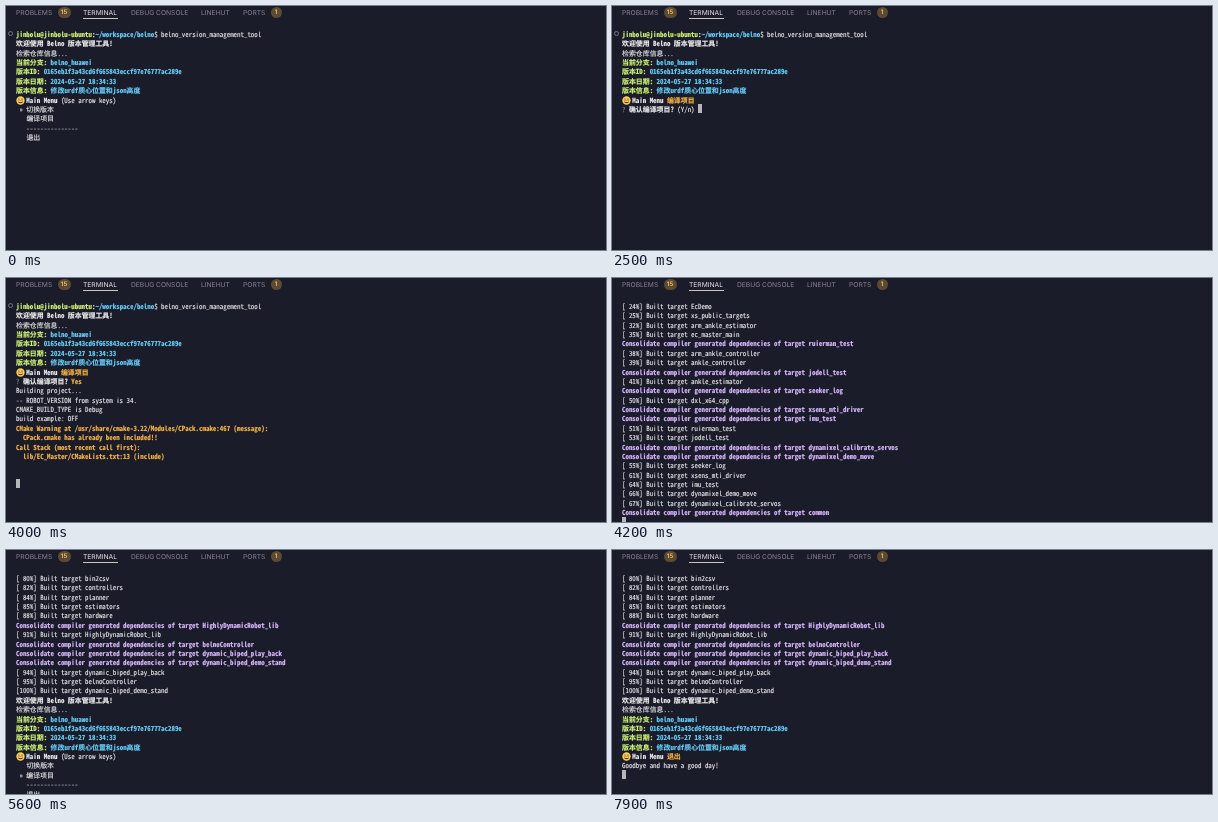
An HTML page that plays this animation: 600x244 px, repeating every 8 s.

```html
<!DOCTYPE html>
<html>
<head>
<meta charset="utf-8">
<title>Terminal session</title>
<style>
html, body { margin: 0; width: 100%; height: 100%; overflow: hidden; background: #1a1c29; }
#stage {
  position: relative; width: 600px; height: 244px; overflow: hidden;
  background: #1a1c29; text-rendering: geometricPrecision;
}
#stage > * { position: absolute; }
.tab {
  top: 1.5px; height: 10px; white-space: pre;
  font: 6.7px/10px Inter, Roboto, sans-serif; color: #85868f;
}
.tab.on { color: #e8e8ea; }
.line { left: 77px; top: 12px; width: 35px; height: 1px; background: #cfc4b6; }
.badge {
  top: 1px; height: 11px; border-radius: 5.5px; background: #5d4a33; color: #f6c270;
  font: 600 6.2px/11.4px Inter, Roboto, sans-serif; text-align: center;
}
.ring { left: 2px; top: 25px; width: 3.4px; height: 3.4px; border: .8px solid #74767f; border-radius: 50%; }
.row {
  left: 10px; height: 9.37px; line-height: 9.37px; white-space: pre; color: #e6e7e8;
  font-family: "Noto Sans Mono CJK SC", "Noto Sans Mono CJK JP", "Noto Sans Mono", monospace;
  -webkit-text-stroke: .15px;
}
.row i {
  font: inherit; font-size: 6.92px; line-height: 0;
  font-family: "Noto Sans Mono CJK SC", "Noto Sans CJK SC", "Noto Sans CJK", "Noto Sans CJK JP", sans-serif;
}
.row svg { position: absolute; left: 0; top: .3px; width: 9px; height: 9px; }
.b, .g, .c, .p, .o { font-weight: 700; }
.b { color: #eeeff0; }
.g { color: #d3f777; }
.c { color: #66cffa; }
.p { color: #d9b6ff; }
.o { color: #f8b346; }
.d { color: #7d8995; }
#cursor { width: 3.5px; height: 9px; background: #b4b6ba; }
</style>
</head>
<body>
<div id="stage">
  <span class="tab" style="left:10px">PROBLEMS</span>
  <span class="badge" style="left:51.5px;width:13px">15</span>
  <span class="tab on" style="left:77px">TERMINAL</span>
  <div class="line"></div>
  <span class="tab" style="left:125px">DEBUG CONSOLE</span>
  <span class="tab" style="left:195px">LINEHUT</span>
  <span class="tab" style="left:237px">PORTS</span>
  <span class="badge" style="left:264.5px;width:11px">1</span>
  <div class="ring" id="ring"></div>
  <div id="cursor"></div>
</div>
<script>
const LOOP = 8000, ROWS = 24, CELL = 3.46, PITCH = 9.37, TOP = 24, LEFT = 10;
const $ = id => document.getElementById(id);

const face = '<svg viewBox="0 0 18 18"><circle cx="9" cy="9" r="8.3" fill="#fbd050"/>' +
  '<path d="M4 9.5h10a5 5 0 0 1-10 0z" fill="#7c2f1c"/><path d="M4.8 10h8.4v1.4H4.8z" fill="#fff"/>' +
  '<circle cx="6" cy="6.2" r="1.3" fill="#55331a"/><circle cx="12" cy="6.2" r="1.3" fill="#55331a"/></svg>';

const built = s => s.split(' ').map(item => {
  const [pct, name] = item.split(':');
  return pct ? `[${pct.padStart(3)}%] Built target ${name}`
             : `{p}Consolidate compiler generated dependencies of target ${name}`;
});

const prompt = '{g}jinbolu@jinbolu-ubuntu{b}:{c}~/workspace/belno{w}$ belno_version_management_tool';
const info = [
  '{b}欢迎使用 Belno 版本管理工具!',
  '检索仓库信息...',
  '{g}当前分支: {c}belno_huawei',
  '{g}版本ID: {c}0165eb1f3a43cd6f665843eccf97e76777ac289e',
  '{g}版本日期: {c}2024-05-27 18:34:33',
  '{g}版本信息: {c}修改urdf质心位置和json高度'
];
const title = tail => '{e}{b}   Main Menu ' + tail;
const menu = pick => [title('{w}(Use arrow keys)'),
  ...['切换版本', '编译项目', '---------------', '退出'].map((s, i) => (i === pick ? ' » ' : '   ') + s)];

const head = [prompt, ...info];
const chosen = title('{o}编译项目');
const ask = answer => '{d}? {b}确认编译项目? ' + answer;
const confirmed = [...head, chosen, ask('{o}Yes'), 'Building project...'];
const config = [
  '-- ROBOT_VERSION from system is 34.',
  'CMAKE_BUILD_TYPE is Debug',
  'build example: OFF',
  '{o}CMake Warning at /usr/share/cmake-3.22/Modules/CPack.cmake:467 (message):',
  '{o}  CPack.cmake has already been included!!',
  '{o}Call Stack (most recent call first):',
  '{o}  lib/EC_Master/CMakeLists.txt:13 (include)',
  '', ''
];
const log = built('24:EcDemo 25:xs_public_targets 32:arm_ankle_estimator 35:ec_master_main :ruierman_test ' +
  '38:arm_ankle_controller 39:ankle_controller :jodell_test 41:ankle_estimator :seeker_log 50:dxl_x64_cpp ' +
  ':xsens_mti_driver :imu_test 51:ruierman_test 53:jodell_test :dynamixel_calibrate_servos ' +
  ':dynamixel_demo_move 55:seeker_log 61:xsens_mti_driver 64:imu_test 66:dynamixel_demo_move ' +
  '67:dynamixel_calibrate_servos :common 80:bin2csv 82:controllers 84:planner 85:estimators 88:hardware ' +
  ':HighlyDynamicRobot_lib 91:HighlyDynamicRobot_lib :belnoController :dynamic_biped_play_back ' +
  ':dynamic_biped_demo_stand 94:dynamic_biped_play_back 95:belnoController 100:dynamic_biped_demo_stand');
const full = [...log, ...info];
const tail = full.slice(23);

// Build output: the cursor sits on the row below the last printed line.
const scrolled = n => {
  const lines = full.slice(Math.max(0, n - ROWS + 1), n);
  return { lines, cursor: [lines.length, 0] };
};

// [start time, screen]
const scenes = [
  [0, { lines: [...head, ...menu(0)], ring: true }],
  [100, { lines: [...head, ...menu(1)], ring: true }],
  [2200, { lines: [...head, chosen, ask('{w}(Y/n) ')], cursor: [8, 22], ring: true }],
  [2900, { lines: confirmed, cursor: [10, 0], ring: true }],
  [3300, { lines: [...confirmed, ...config], cursor: [19, 0], ring: true }],
  [4150, scrolled(23)],
  [4300, scrolled(27)],
  [4400, scrolled(32)],
  [4500, scrolled(36)],
  [4600, scrolled(42)],
  [4700, { lines: [...tail, ...menu(0)] }],
  [5600, { lines: [...tail, ...menu(1)] }],
  [6300, { lines: [...tail, ...menu(3)] }],
  [7500, { lines: [...tail, title('{o}退出'), 'Goodbye and have a good day!'], cursor: [21, 0] }]
];

const wide = s => s.replace(/[\u4e00-\u9fff]+/g, '<i>$&</i>');
const markup = line => line.split(/(?=\{\w\})/).map(part => {
  const m = part.match(/^\{(\w)\}([^]*)$/);
  if (!m) return wide(part);
  return m[1] === 'e' ? face : `<span class="${m[1]}">${wide(m[2])}</span>`;
}).join('');

const rows = Array.from({ length: ROWS }, (_, i) => {
  const row = document.createElement('div');
  row.className = 'row';
  row.style.top = TOP + i * PITCH + 'px';
  $('stage').append(row);
  return row;
});

// Choose the font size whose advance equals one terminal cell.
const pen = document.createElement('canvas').getContext('2d');
pen.font = '100px ' + getComputedStyle(rows[0]).fontFamily;
const size = CELL * 1000 / pen.measureText('0000000000').width;
rows.forEach(row => row.style.fontSize = size + 'px');

let shown;
function draw(now) {
  const t = now % LOOP;
  const scene = scenes.filter(s => s[0] <= t).pop()[1];
  if (scene === shown) return;
  shown = scene;
  rows.forEach((row, i) => row.innerHTML = markup(scene.lines[i] || ''));
  $('ring').hidden = !scene.ring;
  const cursor = $('cursor');
  cursor.hidden = !scene.cursor;
  if (scene.cursor) {
    const [row, col] = scene.cursor;
    cursor.style.top = TOP - 1 + row * PITCH + 'px';
    cursor.style.left = LEFT + col * CELL + 'px';
  }
}

const start = performance.now();
function tick() {
  draw(performance.now() - start);
  requestAnimationFrame(tick);
}
tick();
</script>
</body>
</html>
```
